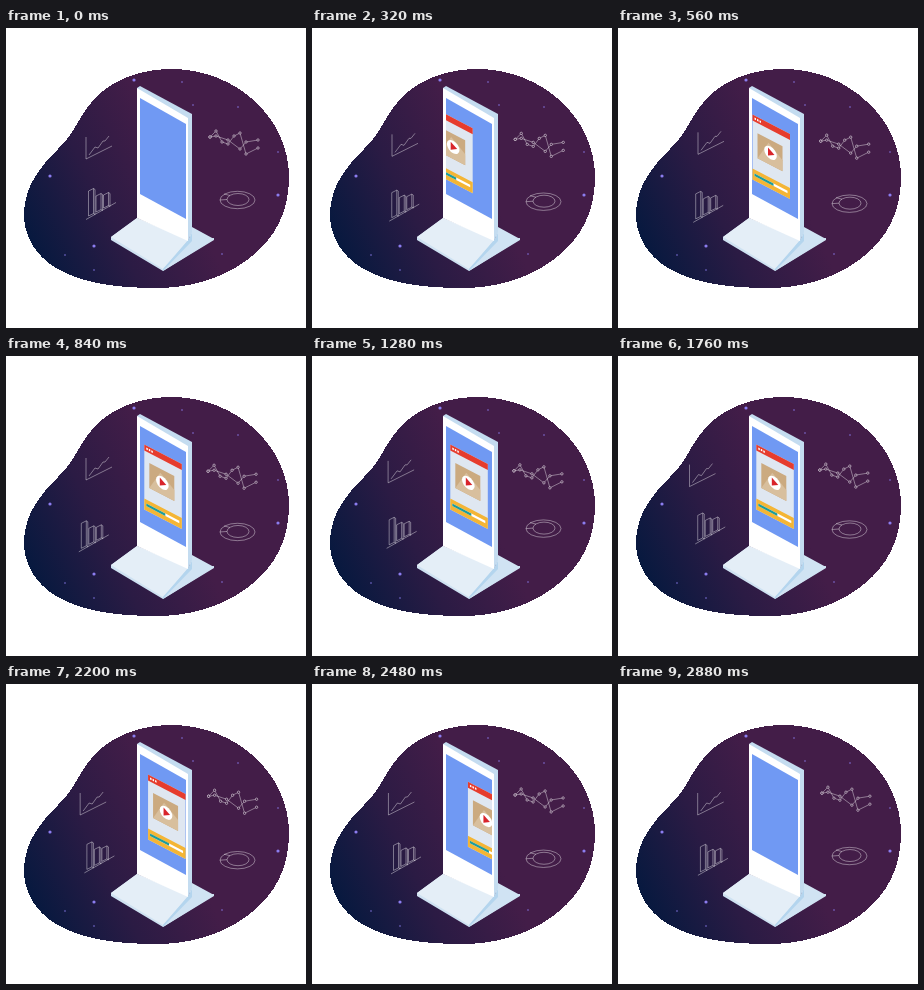
These frames come from a looping animation (300x300 px, 2.92 s). An HTML page:

```html
<!DOCTYPE html>
<html lang="en">
<head>
<meta charset="utf-8">
<style>
html, body { margin: 0; width: 100%; height: 100%; overflow: hidden; background: #fff; }
svg { display: block; width: 100%; height: 100%; }
.icon { fill: none; stroke: #fff; stroke-width: .5; stroke-opacity: .8; stroke-linejoin: round; }
.stars { stroke: #8c7df0; stroke-linecap: round; }
</style>
</head>
<body>
<svg viewBox="0 0 300 300">
  <defs>
    <linearGradient id="night" gradientUnits="userSpaceOnUse" x1="25" y1="215" x2="170" y2="145">
      <stop offset="0" stop-color="#07193f"/>
      <stop offset=".5" stop-color="#2b1b44"/>
      <stop offset="1" stop-color="#431d48"/>
    </linearGradient>
    <clipPath id="screen"><path d="M134 70L180 96V191L134 166Z"/></clipPath>
    <marker id="dot" viewBox="-2 -2 4 4" markerWidth="4" markerHeight="4" markerUnits="userSpaceOnUse">
      <circle r="1.2" fill="#431d48" stroke="#fff" stroke-width=".5"/>
    </marker>
  </defs>

  <path fill="url(#night)" shape-rendering="crispEdges" d="M18 184C19 158 34 139 52 121C73 101 72 84 97 63C115 48 142 41 165 41C230 41 283 90 283 149C283 183 270 211 241 232C214 252 182 260 150 260C110 260 75 255 50 240C30 228 17 208 18 184Z"/>
  <path class="stars" stroke-width="3.2" d="M128 52h0M44 148h0M88 218h0M272 167h0"/>
  <path class="stars" stroke-width="1.5" d="M176 54h0M187 77h0M232 79h0M272 124h0M216 226h0M59 227h0M88 242h0"/>

  <path id="line" class="icon" d="M80 109V131L106 118M83 127L89 119L92 120L97 113L99 113L103 108"/>
  <path id="bars" class="icon"/>
  <g id="net" class="icon" marker-start="url(#dot)" marker-mid="url(#dot)" marker-end="url(#dot)">
    <polyline points="204,109 210,103 216,114 222,116 228,108 234,105 240,126 252,120"/>
    <polyline points="204,109 210,108 222,112 234,121 240,114 252,112"/>
  </g>
  <g id="ring" class="icon">
    <ellipse cx="231.5" cy="172" rx="17.5" ry="8.7"/>
    <ellipse cx="232" cy="171.500" rx="11" ry="6"/>
    <path d="M214 172L221 171.500M218 166L224 167.500"/>
  </g>

  <path fill="#cfe2f2" d="M105 209L131 190L183 212L208 210V212L157 243L105 212Z"/>
  <path fill="#e4eef7" d="M105 209L131 190L183 212L157 241Z"/>
  <path fill="#d0e3f3" d="M183 211L186 199L208 211L157 243Z"/>
  <path fill="#b4d5ee" d="M157 241L183 211L186 205V213L157 243Z"/>
  <path fill="#c4dcf0" d="M131 60L134 58L186 86V204L182 213Z"/>
  <path fill="#fff" d="M131 60L182 90V213L131 190Z"/>
  <path fill="#7099f3" d="M134 70L180 96V191L134 166Z"/>

  <g clip-path="url(#screen)">
    <g id="player">
      <path fill="#dfe7f1" d="M0 0H37.500V65H0Z"/>
      <path fill="#e63c2d" d="M0 0H37.500V6H0Z"/>
      <path stroke="#fff" stroke-width="2" stroke-dasharray="1.500 1" d="M2 3H8.500"/>
      <path fill="#cbaa80" d="M5 16H30V41H5Z"/>
      <path fill="#d8bf9d" d="M5 41L16 20L30 30V41Z"/>
      <circle cx="18" cy="29" r="6.300" fill="#fff"/>
      <path fill="#d9252b" d="M15.500 25L22 29L15.500 33Z"/>
      <path fill="#f4b535" d="M0 54H37.500V65H0Z"/>
      <path fill="#fff" d="M2 58H35V60.500H2Z"/>
      <path fill="#1d9c9b" d="M2 58H21V60.500H2Z"/>
    </g>
  </g>
</svg>
<script>
const LOOP = 2920, STEP = 40;
const el = id => document.getElementById(id);
const place = (id, transform) => el(id).setAttribute("transform", transform);
const clamp = v => Math.max(0, Math.min(1, v));

// Triangular drift: home, to p, to q, back home
function drift(u, p, q) {
  const home = [0, 0];
  const [from, to, k] = u < .3 ? [home, p, u / .3]
    : u < .62 ? [p, q, (u - .3) / .32]
    : [q, home, (u - .62) / .38];
  return `translate(${from.map((v, i) => v + (to[i] - v) * k)})`;
}

function draw(t) {
  const u = t / LOOP;
  place("line", drift(u, [0, -7.3], [-9, 0]));
  place("bars", drift(u, [-7.5, 4.5], [-2.5, -4]));
  place("net", drift(u, [-2, 6.5], [-2.2, 5]));
  place("ring", `translate(0 ${2.1 * (1 - Math.cos(4 * Math.PI * u))})`);

  // The player eases in from the left and out to the right
  const enter = 1 - clamp(t / 800), leave = clamp((t - 1960) / 840);
  const shift = 46 * leave ** 2 - 42 * enter ** 2;
  place("player", `matrix(1 .52 0 1 ${138.3 + shift} ${88.5 + shift * .52})`);
}

// Each bar stands on the slanted baseline
const bar = (height, i) =>
  `M${82.5 + 7.5 * i} ${188 - 4 * i}v${-height}l5 -2.5v${height}zm5 -2.500l1.500 1v${-height}l-1.500 -1`;
el("bars").setAttribute("d", "M80 191.5L110 174.5" + [25, 16, 13].map(bar).join(""));

const start = performance.now();
function tick() {
  const t = (performance.now() - start) % LOOP;
  draw(Math.floor(t / STEP) * STEP);
  requestAnimationFrame(tick);
}
tick();
</script>
</body>
</html>
```
